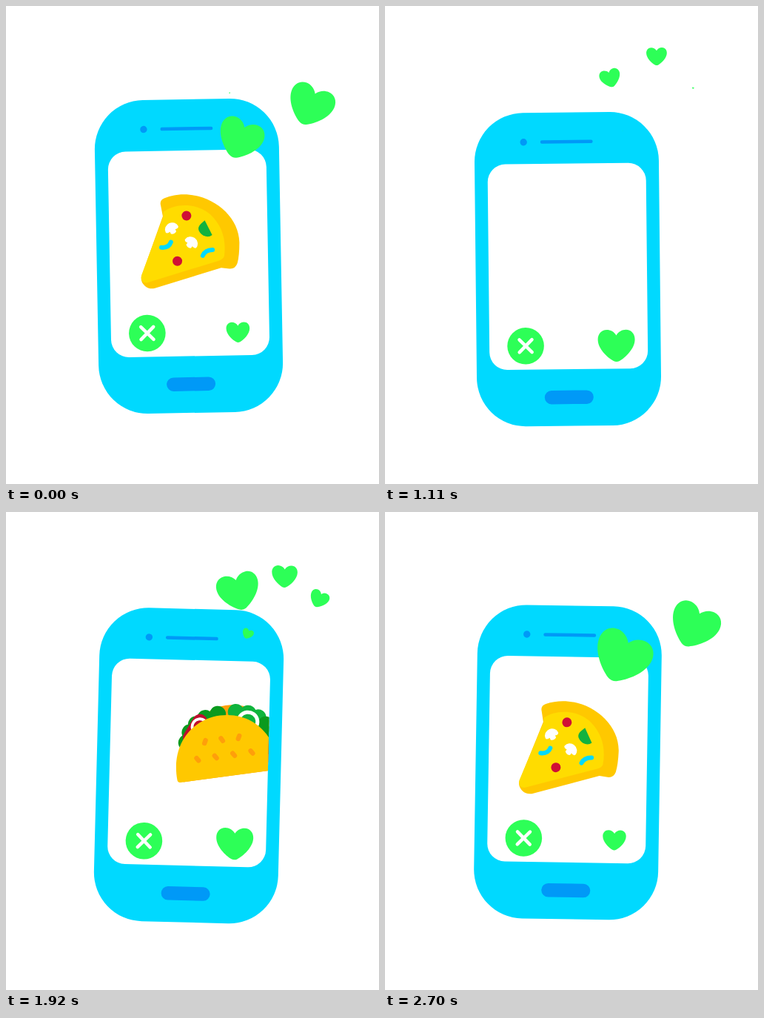
Recreate the animation shown at these times as an HTML page. Size 504 by 645 pixels, loop 2730 ms.

```html
<!DOCTYPE html>
<html lang="en">
<head>
<meta charset="utf-8">
<title>Food swipe</title>
<style>
  html, body { margin: 0; width: 100%; height: 100%; overflow: hidden; background: #fff; }
  svg { display: block; width: 504px; height: 645px; }
  .cyan { fill: #00d9ff; }
  .blue { fill: #0099f7; }
  .green { fill: #2dff57; }
  .red { fill: #bf0d2e; }
  .line { fill: none; stroke-linecap: round; }
</style>
</head>
<body>
<svg viewBox="0 0 504 645">
  <defs>
    <clipPath id="screen"><rect x="140" y="235.5" width="214" height="277.5" rx="24"/></clipPath>
    <path id="heart" d="M0-14C-3-19-8-21.5-13-21.5C-20-21.5-25-16-25-8.5C-25 4-12 16-4 20.5Q0 22.5 4 20.5C12 16 25 4 25-8.5C25-16 20-21.5 13-21.5C8-21.5 3-19 0-14Z"/>
    <path id="shroom" fill="#fff" d="M-9.5 2A9.5 9 0 0 1 9.5 2Q9 5 4 4V7Q0 10-4 7V4Q-9 5-9.5 2Z"/>
  </defs>
  <g id="phone">
    <rect class="cyan" x="122.5" y="166.5" width="249" height="423" rx="66"/>
    <circle class="blue" cx="189" cy="206" r="4.7"/>
    <path class="line" stroke="#0099f7" stroke-width="4.5" d="M213.8 206H280.2"/>
    <rect class="blue" x="214" y="541.5" width="66" height="18.5" rx="9.2"/>
    <rect x="140" y="235.5" width="214" height="277.5" rx="24" fill="#fff"/>
    <g clip-path="url(#screen)">
      <g id="pizza">
        <path fill="#ffc800" d="M213 324L210.5 309Q209 302 216 299.5C262 283 316 318 315.500 362Q315 380 312 390Q309 398 301 397L290 395.500L199 421Q191 422 186 417Q180 411 182 404Z"/>
        <path fill="#ffdc00" d="M213.500 325L182 403Q180 413 189 413L287 386Q293 384 294.500 380C298 358 293 339 277 323C258 306 230 307 214 318Z"/>
        <g fill="#d00f35"><circle cx="245" cy="324" r="6.5"/><circle cx="231" cy="385" r="6.5"/></g>
        <path fill="#12b23f" d="M269.500 331L279 351Q274 355 267 351.500Q256 343 264 335.500Z"/>
        <path class="line" stroke="#00d9ff" stroke-width="6" d="M210 366Q220 367 223 359M265.500 378.500Q269 371 279 371"/>
        <use href="#shroom" transform="translate(224 340) rotate(-25)"/>
        <use href="#shroom" transform="translate(251 360) rotate(38)"/>
      </g>
      <g id="fries">
        <path class="blue" d="M204 354L211 337H297L304 353Z"/>
        <g id="sticks"></g>
        <path class="cyan" stroke="#00d9ff" stroke-width="2" stroke-linejoin="round" d="M205 354Q254 328 303 353L290 418H218.500Z"/>
      </g>
      <g id="taco">
        <path fill="#ff9f0a" d="M180 402C180 340 215 307 250 307C290 307 320 340 320 376Q320 396 306 402Z"/>
        <g id="lettuce"></g>
        <path class="line" stroke="#bf0d2e" stroke-width="20" d="M197 344L213 324M304 371V384"/>
        <g class="red" stroke="#fff" stroke-width="3.800">
          <circle cx="212" cy="331" r="10.600"/>
          <circle cx="277" cy="333" r="13" fill="#0fb43c" stroke-width="5"/>
        </g>
        <path fill="#ffc800" d="M172 398C170 350 202 319.500 241 319.500C280 319.500 312 350 310 398Q310 402 306 402H176Q172 402 172 398Z"/>
        <g id="seeds" fill="#ff9f0a"></g>
      </g>
    </g>
    <circle class="green" cx="189" cy="481" r="24.800"/>
    <path class="line" stroke="#fff" stroke-width="4.500" d="M180.500 472.500L197.500 489.500M197.500 472.500L180.500 489.500"/>
    <use id="like" class="green" href="#heart"/>
    <g id="hearts" class="green"></g>
  </g>
</svg>
<script>
const CYCLE = 910, LOOP = CYCLE * 3, HALF = 325, LIFE = 600;
const $ = id => document.getElementById(id);
const clamp = v => Math.min(1, Math.max(0, v));
const set = (el, v) => el.setAttribute('transform', v);
const foods = ['pizza', 'fries', 'taco'].map($);

function add(parent, tag, attrs) {
  const el = document.createElementNS('http://www.w3.org/2000/svg', tag);
  for (const k in attrs) el.setAttribute(k, attrs[k]);
  return parent.appendChild(el);
}

function bar(parent, x, y, tilt, width, height, fill) {
  const el = add(parent, 'rect', { x: -width / 2, width, height, rx: Math.min(3.4, width / 2) });
  if (fill) el.setAttribute('fill', fill);
  set(el, `translate(${x} ${y}) rotate(${tilt})`);
}

// fries fan out under a parabola
const fry = (x, y, fill) => bar($('sticks'), x, y, (x - 246) * 0.3, 13.4, 46, fill);
fry(276, 292, '#ffff00');
for (let i = 0; i < 8; i++) {
  const x = 210 + 12 * i;
  fry(x, 292 + 0.0135 * (x - 250) ** 2, i % 2 ? '#ffdc00' : '#ffff00');
}

// lettuce lobes along a squarish arch
const bend = v => Math.sign(v) * Math.abs(v) ** 0.8;
for (let deg = 160; deg >= 0; deg -= 16) {
  const a = deg * Math.PI / 180;
  add($('lettuce'), 'circle', {
    cx: 248 + 60 * bend(Math.cos(a)), cy: 374 - 57 * bend(Math.sin(a)), r: 11,
    fill: deg > 40 && deg < 85 ? '#0fb43c' : '#0a9a1e'
  });
}

for (let i = 0; i < 3; i++) bar($('seeds'), 216 + 23 * i + (i % 2 ? -2.5 : 2.5), 347.300, i % 2 ? -28 : 28, 6.400, 10.600);
for (let i = 0; i < 4; i++) bar($('seeds'), 200 + 24.600 * i, 369.600, -33, 6.400, 10.600);

// each heart rises `rise` px to (x, y), slowing by `pow`; `size` is width per px left to go
const hearts = [
  { x: 419, y: 134, tilt: 24, start: -90, rise: 92, pow: 5, size: 2 },
  { x: 323, y: 192, tilt: 23, start: -100, rise: 95, pow: 7, size: 2.9 },
  { x: 306, y: 107, tilt: -15, start: 0, rise: 52, pow: 2.5, size: 2.17 },
  { x: 370, y: 64, tilt: 0, start: 40, rise: 69, pow: 2, size: 1 }
];
for (const h of hearts) h.el = add($('hearts'), 'use', { href: '#heart' });
const lead = [0, 55, 0]; // how early each burst fires

function drawHeart(h, p) {
  const age = p - h.start;
  const left = h.rise * (1 - clamp(age / LIFE)) ** h.pow;
  const s = age > 0 ? left * h.size * (1 - Math.exp(-age / 65)) / 49 : 0;
  set(h.el, `translate(${h.x} ${h.y + left}) scale(${s}) ` +
    `translate(${-0.15 * h.tilt} ${0.12 * Math.abs(h.tilt)}) rotate(${h.tilt})`);
}

function wobble(p) {
  if (p < -175 || p > 225) return 0;
  return -1.75 * Math.sin(2 * Math.PI * (p + 15) / 160) * Math.min(1, (305 - p) / 245);
}

function pulse(p) {
  const u = clamp(Math.abs(p + 15) / 115);
  return 1 - 0.385 * Math.cos(Math.PI / 2 * u) ** 2;
}

function draw(t) {
  const turn = Math.floor((t + HALF) / CYCLE);
  const p = t - turn * CYCLE;
  const lift = p < HALF ? -40.5 * Math.cos(Math.PI / 2 * p / HALF) : 0;
  set($('phone'), `translate(0 ${lift}) rotate(${wobble(p)} 247 378)`);
  set($('like'), `translate(311.6 482) scale(${pulse(p)})`);

  // swipe out to the right, then the next dish swings in from the left
  const leaving = p < 195;
  const u = leaving ? clamp((p + 5) / 210) : 1 - clamp((p - 190) / 270);
  const [x, y, a] = leaving ? [206 * u * u, -23 * u, -18 * u] : [-255 * u * u, -16 * u, -33.5 * u];
  const shown = (turn + (leaving ? 0 : 1)) % 3;
  foods.forEach((f, i) => f.style.display = i === shown ? '' : 'none');
  set(foods[shown], `translate(${x} ${y}) rotate(${a} 247 357)`);

  for (const h of hearts) drawHeart(h, p + lead[turn % 3]);
}

const start = performance.now();
function tick() {
  draw((performance.now() - start) % LOOP);
  requestAnimationFrame(tick);
}
tick();
</script>
</body>
</html>
```
